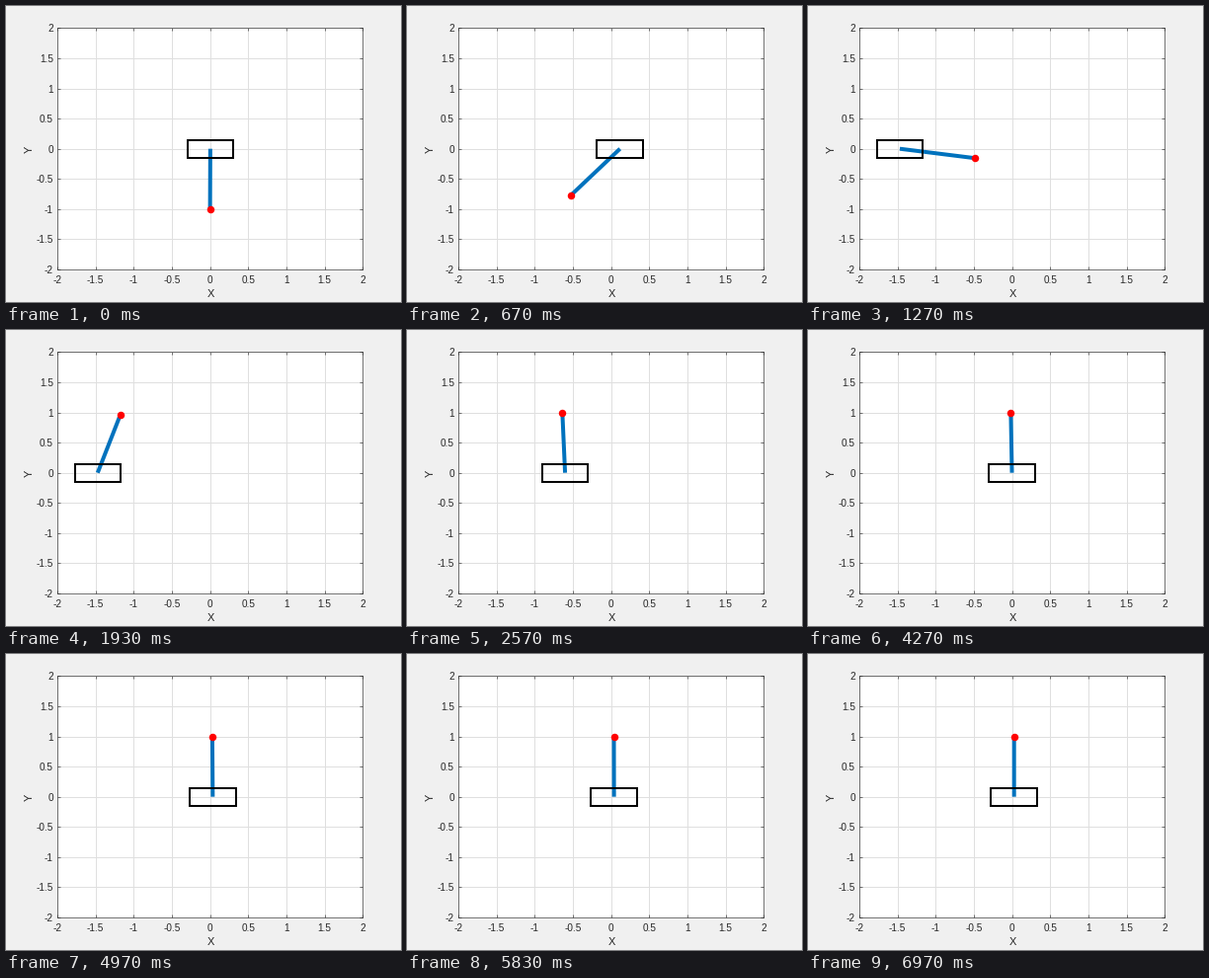
A matplotlib script for the animation above (7.01 s loop, 400x300 px).

```python
import numpy as np
import matplotlib.pyplot as plt
from matplotlib.animation import FuncAnimation
from matplotlib.patches import Rectangle

plt.rcParams.update({"font.family": "Liberation Sans", "axes.unicode_minus": False})

W, H, DPI = 400, 300, 100
PX = 72 / DPI  # points per pixel
FRAMES, LOOP = 175, 7010
INK = "#262626"
CART_W, CART_H = 0.6, 0.3

CATCH = 2.24  # time when the pole is up and balancing begins
X0, V0, DECAY, G = -0.96, 0.468, 0.82, 9.81

# swing-up key points: time, cart position, pole angle from hanging down
KEYS = np.array([
    (0, 0, 0), (0.45, 0.33, -0.62), (0.7, 0.05, -0.66), (1, -0.74, 0.22),
    (1.262, -1.471, 1.415), (1.6, -1.83, 2.28), (CATCH, X0, 3.09),
])
T, POSE = KEYS[:, 0], KEYS[:, 1:]
SLOPE = np.gradient(POSE, T, axis=0)
SLOPE[0] = 0
SLOPE[-1] = V0 - DECAY * X0, 0.5


def swing(t):
    """Smooth Hermite curve through the key points."""
    i = np.searchsorted(T, t, side="right") - 1
    h = T[i + 1] - T[i]
    u = (t - T[i]) / h
    return ((1 + 2 * u) * (1 - u) ** 2 * POSE[i] + u * (1 - u) ** 2 * h * SLOPE[i]
            + u * u * (3 - 2 * u) * POSE[i + 1] + u * u * (u - 1) * h * SLOPE[i + 1])


def balance(s):
    """Critically damped return to centre; the pole leans against the acceleration."""
    fade = np.exp(-DECAY * s)
    x = (X0 + V0 * s) * fade
    accel = DECAY ** 2 * x - 2 * DECAY * V0 * fade
    return x, np.pi - accel / G - 0.195 * np.exp(-3.2 * s)


def pose(t):
    return swing(t) if t < CATCH else balance(t - CATCH)


fig = plt.figure(figsize=(W / DPI, H / DPI), dpi=DPI, facecolor="#f0f0f0")
ax = fig.add_axes([52 / W, 33 / H, 309.4 / W, 244.6 / H], facecolor="white")
ax.set(xlim=(-2, 2), ylim=(-2, 2))
ticks = np.arange(-2, 2.1, 0.5)
names = [f"{v:g}" for v in ticks]
ax.set_xticks(ticks, names)
ax.set_yticks(ticks, names)
ax.tick_params(direction="in", top=True, right=True, length=3 * PX, width=0.6 * PX,
               color=INK, labelcolor=INK, labelsize=10 * PX)
ax.tick_params(axis="x", pad=6 * PX)
ax.tick_params(axis="y", pad=4 * PX)
ax.set_axisbelow(True)
ax.grid(color="#dfdfdf", linewidth=PX)
for spine in ax.spines.values():
    spine.set(color=INK, linewidth=0.6 * PX)
label = dict(fontsize=11 * PX, color=INK, ha="center", va="center")
fig.text(207 / W, 1 - 292 / H, "X", **label)
fig.text(23.5 / W, 1 - 145 / H, "Y", rotation=90, **label)

pole, = ax.plot([], [], color="#0072bd", linewidth=4 * PX, solid_capstyle="butt", zorder=3)
cart = ax.add_patch(Rectangle((0, 0), CART_W, CART_H, fill=False, edgecolor="black",
                              linewidth=2 * PX, joinstyle="miter", zorder=4))
bob, = ax.plot([], [], "o", color="red", markersize=7.5 * PX, markeredgewidth=0, zorder=5)


def draw(n):
    x, angle = pose((n + 0.5) * LOOP / FRAMES / 1000)
    tip = x + np.sin(angle), -np.cos(angle)
    pole.set_data([x, tip[0]], [0, tip[1]])
    cart.set_xy((x - CART_W / 2, -CART_H / 2))
    bob.set_data([tip[0]], [tip[1]])
    return pole, cart, bob


anim = FuncAnimation(fig, draw, frames=FRAMES, interval=LOOP / FRAMES, repeat=True,
                     repeat_delay=0, blit=False)
plt.show()
```
